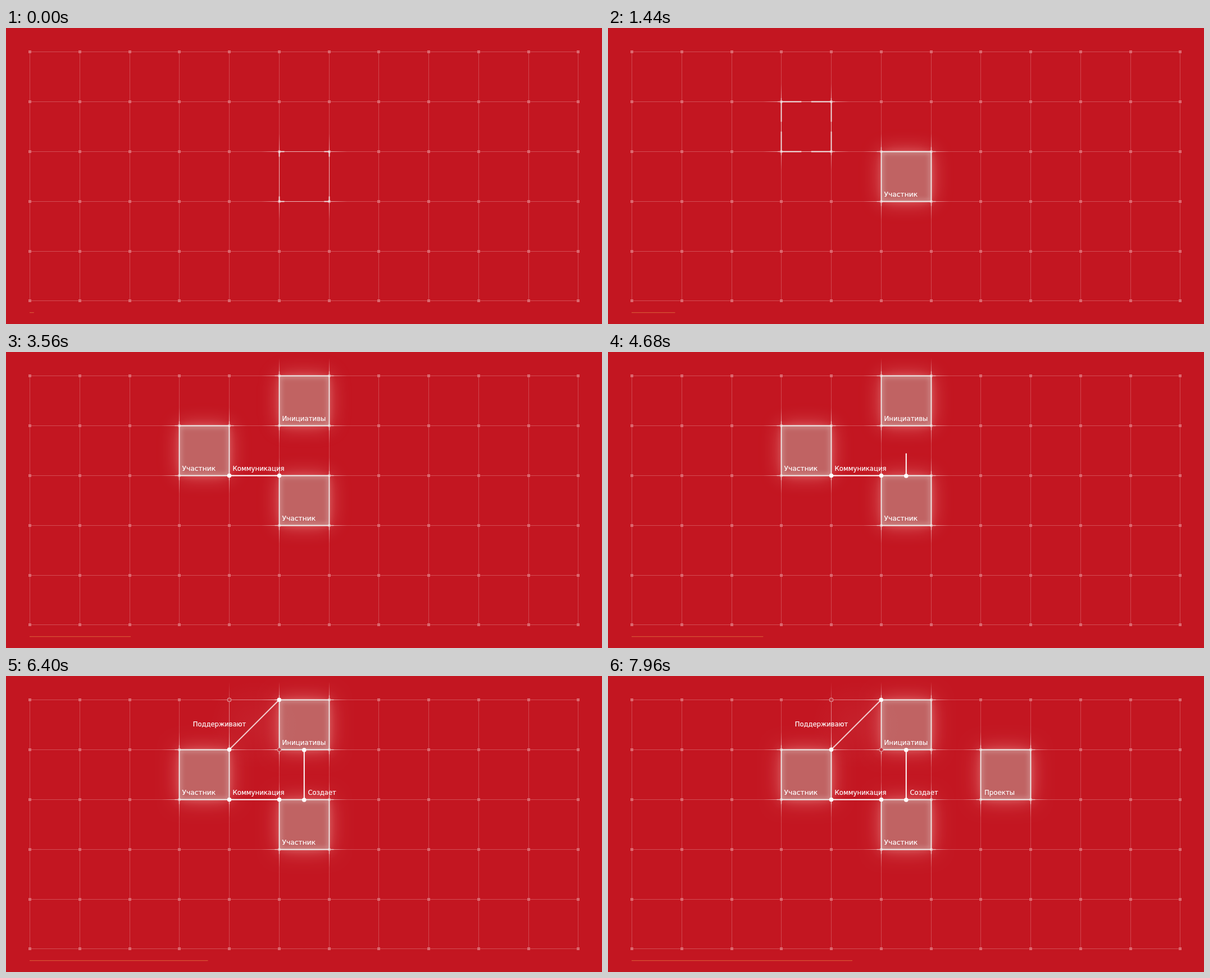
Animation, 1061 px wide and 528 px high, one loop 8000 ms. Source, as an HTML page with a canvas:

```html
<!DOCTYPE html>
<html lang="ru">
<head>
<meta charset="utf-8">
<title>Схема участия</title>
<style>
  html, body { margin: 0; width: 100%; height: 100%; overflow: hidden; background: #c31621; }
  canvas { display: block; width: 1061px; height: 528px; }
</style>
</head>
<body>
<canvas id="stage" width="1061" height="528"></canvas>
<script>
const W = 1061, H = 528, LOOP = 8000;
const c = document.getElementById('stage').getContext('2d');

const gx = i => Math.floor(42.6 + 88.76 * i) + 0.5;
const gy = j => Math.floor(42.6 + 88.85 * j) + 0.5;
const white = a => `rgba(255,255,255,${a})`;
const ramp = (t, from, to) => Math.min(1, Math.max(0, (t - from) / (to - from)));
const smooth = p => p * p * (3 - 2 * p);

const boxes = [
  { i: 5, j: 2, start: -160, text: 'Участник', size: 12.3, dx: 5 },
  { i: 3, j: 1, start: 1100, text: 'Участник', size: 12.3, dx: 5 },
  { i: 5, j: 0, start: 2700, text: 'Инициативы', size: 11.8, dx: 5 },
  { i: 7, j: 1, start: 6850, text: 'Проекты', size: 11.8, dx: 6.5 }
];

const links = [
  { from: [486.5, 220.5], to: [397.5, 220.5], start: 2168, alpha: 1,
    text: 'Коммуникация', size: 11.7, at: [403.5, 212], label: 2650 },
  { from: [530.8, 221], to: [530.8, 132], start: 4455, alpha: 1,
    text: 'Создает', size: 11.6, at: [537.5, 212], label: 4860 },
  { from: [397.5, 131.3], to: [486.3, 42.5], start: 5250, alpha: 0.76,
    text: 'Поддерживают', size: 11.55, at: [332.8, 90], label: 5930 }
];

function line(x1, y1, x2, y2, style, width) {
  c.strokeStyle = style;
  c.lineWidth = width;
  c.beginPath();
  c.moveTo(x1, y1);
  c.lineTo(x2, y2);
  c.stroke();
}

function label(text, x, y, size, alpha) {
  if (alpha <= 0) return;
  c.font = `${size}px "DejaVu Sans", sans-serif`;
  c.fillStyle = white(alpha);
  c.fillText(text, x, y);
  c.strokeStyle = white(alpha);
  c.lineWidth = 0.2;
  c.strokeText(text, x, y);
}

function disc(x, y, r) {
  c.fillStyle = '#fff';
  c.beginPath();
  c.arc(x, y, r, 0, 7);
  c.fill();
}

function ring(x, y, alpha) {
  c.save();
  c.globalAlpha = alpha;
  c.fillStyle = '#c63640';
  c.strokeStyle = '#e3959a';
  c.lineWidth = 1.1;
  c.beginPath();
  c.arc(x, y, 3.3, 0, 7);
  c.fill();
  c.stroke();
  c.restore();
}

// Thin line through two nodes, fading out beyond them
function guide(x1, y1, x2, y2, alpha) {
  const len = Math.hypot(x2 - x1, y2 - y1), out = 32;
  const ux = (x2 - x1) / len, uy = (y2 - y1) / len;
  const a = [x1 - ux * out, y1 - uy * out], b = [x2 + ux * out, y2 + uy * out];
  const g = c.createLinearGradient(...a, ...b), edge = out / (len + 2 * out);
  g.addColorStop(0, white(0));
  g.addColorStop(edge, white(alpha));
  g.addColorStop(1 - edge, white(alpha));
  g.addColorStop(1, white(0));
  line(...a, ...b, g, 1);
}

function frameGuides(x, y, x2, y2, alpha) {
  guide(x, y, x2, y, alpha);
  guide(x, y2, x2, y2, alpha);
  guide(x, y, x, y2, alpha);
  guide(x2, y, x2, y2, alpha);
}

function drawGrid() {
  c.fillStyle = '#c31621';
  c.fillRect(0, 0, W, H);
  for (let i = 0; i < 12; i++) line(gx(i), gy(0), gx(i), gy(5), 'rgba(255,235,230,.24)', 1);
  for (let j = 0; j < 6; j++) line(gx(0), gy(j), gx(11), gy(j), 'rgba(255,235,230,.26)', 1);
  c.fillStyle = '#db686f';
  for (let i = 0; i < 12; i++)
    for (let j = 0; j < 6; j++) c.fillRect(gx(i) - 2.5, gy(j) - 2.5, 5, 5);
}

function drawGlow(x, y, w, h, alpha) {
  c.save();
  c.beginPath();
  c.rect(0, 0, W, H);
  c.rect(x, y, w, h);
  c.clip('evenodd');
  c.fillStyle = '#fff';
  for (const [blur, a] of [[36, 0.42], [12, 0.22]]) {
    c.shadowColor = `rgba(255,205,195,${a * alpha})`;
    c.shadowBlur = blur;
    // The caster sits off stage, only its shadow shows
    c.shadowOffsetX = 2000;
    c.fillRect(x - 2000, y, w, h);
  }
  c.restore();

  c.fillStyle = `rgba(189,183,172,${0.48 * alpha})`;
  c.fillRect(x, y, w, h);

  c.save();
  c.beginPath();
  c.rect(x, y, w, h);
  c.clip();
  c.shadowColor = white(0.35 * alpha);
  c.shadowBlur = 9;
  c.shadowOffsetX = 2000;
  c.strokeStyle = '#fff';
  c.lineWidth = 5;
  c.strokeRect(x - 2000, y, w, h);
  c.restore();
}

function drawBox(b, t) {
  const s = t - b.start;
  if (s <= 0) return;
  const x = gx(b.i), y = gy(b.j), x2 = gx(b.i + 1), y2 = gy(b.j + 1);
  const w = x2 - x, h = y2 - y;
  const lit = smooth(ramp(s, 330, 900)), grow = ramp(s, 100, 400);

  if (lit > 0) drawGlow(x, y, w, h, lit);
  frameGuides(x, y, x2, y2, 0.6 * ramp(s, 0, 140));

  if (grow > 0) {
    const reach = grow * w / 2, out = 8 * grow;
    const ink = 'rgba(240,246,244,.93)', faint = 'rgba(240,246,244,.45)';
    for (const [cx, dx] of [[x, 1], [x2, -1]])
      for (const [cy, dy] of [[y, 1], [y2, -1]]) {
        line(cx - dx * out, cy, cx, cy, faint, 1.5);
        line(cx, cy - dy * out, cx, cy, faint, 1.5);
        line(cx, cy, cx + dx * reach, cy, ink, 1.8);
        line(cx, cy, cx, cy + dy * reach, ink, 1.8);
      }
  }
  label(b.text, x + b.dx, y2 - 8.5, b.size, ramp(s, 600, 830));
}

function drawLink(k, t) {
  if (t <= k.start) return;
  const p = ramp(t, k.start, k.start + 500);
  const [x, y] = k.from, [x2, y2] = k.to;
  line(x, y, x + (x2 - x) * p, y + (y2 - y) * p, white(k.alpha), 2);
  disc(x, y, 3.8 * ramp(t, k.start, k.start + 100));
  disc(x2, y2, 3.8 * ramp(t, k.start + 460, k.start + 560));
  label(k.text, ...k.at, k.size, ramp(t, k.label, k.label + 190));
}

function drawHelpers(t) {
  const a = ramp(t, 5900, 6150);
  if (!a) return;
  const x = gx(4), x2 = gx(5), y = gy(0), y2 = gy(1);
  const mx = (x + x2) / 2, my = (y + y2) / 2;
  const haze = c.createRadialGradient(mx, my, 10, mx, my, 80);
  haze.addColorStop(0, white(0.04 * a));
  haze.addColorStop(1, white(0));
  c.fillStyle = haze;
  c.fillRect(mx - 80, my - 80, 160, 160);
  guide(x, y, x2, y, 0.28 * a);
  guide(x, y, x, y2, 0.28 * a);
  guide(x, y2, x2, y2, 0.15 * a);
  ring(x, y, a);
  ring(x2, y2, a);
}

function draw(t) {
  drawGrid();
  boxes.forEach(b => drawBox(b, t));
  drawHelpers(t);
  links.forEach(k => drawLink(k, t));
  line(42, 507.7, 49.7 + t * 0.0484, 507.7, 'rgba(235,150,75,.6)', 1);
}

const begin = performance.now();
function tick() {
  draw((performance.now() - begin) % LOOP);
  requestAnimationFrame(tick);
}
tick();
</script>
</body>
</html>
```
